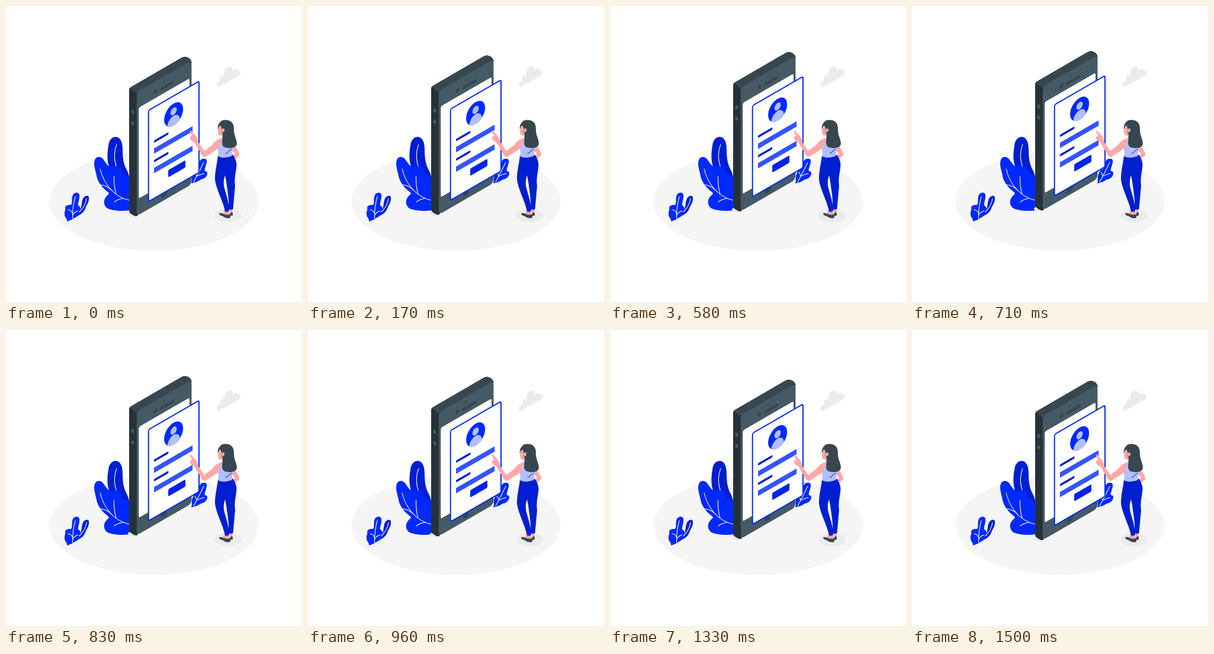
Animation of 500x500 px, one loop 1540 ms. Source, as an HTML page:

```html
<!DOCTYPE html>
<html lang="en">
<head>
<meta charset="utf-8">
<title>Sign-up illustration</title>
<style>
  html, body { margin: 0; height: 100%; overflow: hidden; background: #fff; }
  svg { display: block; width: 100%; height: 100%; }
  .blue { fill: #0029ff; }
  .navy { fill: #001fd0; }
  .pale { fill: #b3bfff; }
  .field { fill: #3354ff; }
  .skin { fill: #ffa8a7; }
  .slate { fill: #37474f; }
  .steel { fill: #455a64; }
  .shade { fill: #ebebeb; }
  .vein { fill: none; stroke: #fff; stroke-width: 1.1; stroke-linecap: round; }
  .line { fill: none; stroke-linecap: round; stroke-linejoin: round; }
</style>
</head>
<body>
<svg viewBox="0 0 500 500">
  <ellipse cx="250" cy="330" rx="176.7" ry="83.7" fill="#f5f5f5"/>
  <path class="shade" d="M357 136C355 134 356 130 359 128Q360 126 362 126C360 120 364 115 369 117C368 108 372 103 377 103C381 102 384 106 383 110C387 105 391 105 391 109C395 108 397 110 396 114Q395 117 391 119L362 135Q359 137 357 136Z"/>

  <g id="tallPlant">
    <path class="navy" d="M175 273C170 262 171 247 173 236C174 225 180 221 186 221C194 222 197 231 197 243C197 258 199 268 204 277Q208 284 209 296L190 300Z"/>
    <path class="vein" d="M187 234C182 246 182 262 188 275"/>
    <path class="blue" d="M150 274C147 261 151 254 158 255C165 256 166 264 173 270C179 273 184 269 191 272C197 275 194 281 198 285Q206 286 209 292V345C197 347 178 346 170 341C163 334 165 325 172 319Q175 317 173 315C165 309 155 299 153 287C152 282 151 279 150 274Z"/>
    <path class="vein" d="M159 275C164 297 180 322 208 328M182.500 288Q182 304 186 318M160 302Q170 303 178 311M183 331Q189 326 198 325"/>
  </g>
  <g id="smallPlant">
    <path class="navy" d="M122 352C128 344 127 335 129 328C131 321 138 318 140 323C141 331 136 336 134 342Q131 350 122 354Z"/>
    <path class="blue" d="M103 364C104 359 99 358 99 352C98 347 101 345 100 341C100 336 106 336 110 336C113 331 110 325 113 319C116 314 123 314 124 319C125 326 121 332 122 337C125 338 127 342 126 347C125 354 117 357 111 361Z"/>
    <path class="vein" d="M117 322Q112 340 112.500 359M105 344Q111 345 112 350M122 346Q115 348 113 353M136 325C135 333 130 342 124 348"/>
  </g>
  <g id="sidePlant">
    <path class="blue" d="M313 300C315 294 312 289 316 282C317 276 323 277 325 272C325 264 328 258 334 258C340 257 340 263 338 268C337 273 335 275 336 279C341 279 341 284 338 288C335 293 330 292 326 295C322 298 317 298 313 300Z"/>
    <path class="vein" d="M334 264Q326 281 317 297M335 283Q329 284 324 287M319 281Q322 284 322 289"/>
  </g>

  <g id="phone">
    <path fill="#e6e6e6" d="M206 351L212 346L224 354L216 357Q212 357 206 353Z"/>
    <path fill="#263238" d="M208 142Q208 138.500 211 137L296 88Q302 84 308 87.500Q313 90 313.500 96L222 354.500Q219 355.500 216 354L210.500 350.500Q208 349 208 346Z"/>
    <path class="slate" d="M209 138.500L211 137L296 87.500Q302 84 308 87.500Q313 90 313.500 95L300 106L222 149Z"/>
    <g transform="matrix(.866 -.5 0 1 220.800 145.800)">
      <rect width="107" height="209" rx="7" class="steel"/>
      <rect x="4" y="28" width="99" height="153.500" rx="3" fill="#fff"/>
      <circle cx="53" cy="198.500" r="6" class="slate"/>
      <path class="line" d="M48 18.500H71" stroke="#37474f" stroke-width="4.800"/>
      <circle cx="36.500" cy="17.500" r="3.500" class="slate"/>
      <circle cx="53" cy="8.500" r="1.600" class="slate"/>
    </g>
    <g class="steel">
      <ellipse cx="214" cy="179" rx="2.500" ry="3.400" transform="rotate(-18 214 179)"/>
      <ellipse cx="214" cy="198" rx="2.500" ry="3.400" transform="rotate(-18 214 198)"/>
    </g>
    <g transform="matrix(.866 -.5 0 1 240.700 176.400)">
      <rect width="98.500" height="154" rx="3" fill="#fff" stroke="#0029ff" stroke-width="2.300"/>
      <clipPath id="disc"><circle cx="49" cy="31.300" r="18.500"/></clipPath>
      <g clip-path="url(#disc)">
        <path class="blue" d="M30 12h38v38h-38z"/>
        <circle cx="49" cy="26" r="6.200" class="pale"/>
        <circle cx="49" cy="45.500" r="12.200" class="pale"/>
      </g>
      <path class="line" d="M12.500 58H37M12.500 91H37" stroke="#001fd0" stroke-width="4"/>
      <path class="field" d="M10.700 69.500h75.300v9h-75.300zM10.700 102.500h75.300v9h-75.300z"/>
      <rect x="38.500" y="120" width="33.500" height="12.300" rx="2" fill="#0024e6"/>
    </g>
  </g>

  <g id="woman">
    <ellipse cx="375" cy="354" rx="23" ry="11" class="shade"/>
    <path class="skin" d="M381 233C388 236 391 242 394 249Q395 252 392 254L386 259L382 255L387 249L380 243Z"/>
    <path class="skin" d="M370 343H376L378 352L371 354L366 351ZM378 342H383L382 350L378 350Z"/>
    <path class="slate" d="M360 350Q363 349 367 351Q372 354 378 352L380 349Q382 347 383 350V354L379 354.500Q380 357 377 358.500Q371 359 366 355Q360 354 360 350Z"/>
    <path class="navy" d="M358 252L383 251Q389 259 389.500 268C389 280 385 290 387 304L383.500 343Q380 345 376 343C377 325 374 312 372 296L370 286Q366 297 369 308C373 322 377 334 377 346Q373 349 370 347C367 330 355 310 353 293C353 278 357 265 358 252Z"/>
    <path class="pale" d="M361 224L372 221Q383 226 385 237Q381 244 382 253Q370 259 358 254Q360 246 357 240Q356 230 361 224Z"/>
    <path class="skin" d="M363 224C356 225 352 230 348 235L335 245L325 230Q324 224 321 220L312 210Q310 211 312 215L315 220Q310 219 311 223Q311 227 318 230L331 252Q334 256 338 254L355 243Q361 239 363 231Z"/>
    <path class="skin" d="M360 201C358 206 359 208 358 212Q358 218 362 219L365 219L364 226Q369 230 374 225L374 202Z"/>
    <path class="slate" d="M358 209C357 203 359 199 361 197C363 193 368 192 372 192.500C381 193 385 199 385 207C384 217 390 224 390 233C389 240 378 242 368 238C363 234 366 226 366 218Q366 215 364 213V206Q363 202 361 202Q359 204 358 209Z"/>
    <path class="skin" d="M364 209Q366 205 369 208Q370 212 365 214Z"/>
    <path class="line" d="M381 242L376 245Q375 249 371 249" stroke="#001fd0" stroke-width="1"/>
  </g>
</svg>
<script>
  const LOOP = 1540, PEAK = 700, REST = 1490, LIFT = 9.7;
  const phone = document.getElementById('phone');

  function draw(now) {
    const t = now % LOOP;
    const rise = Math.max(0, Math.min(t / PEAK, (REST - t) / (REST - PEAK)));
    phone.setAttribute('transform', `translate(0 ${-LIFT * rise})`);
    requestAnimationFrame(draw);
  }
  requestAnimationFrame(draw);
</script>
</body>
</html>
```
